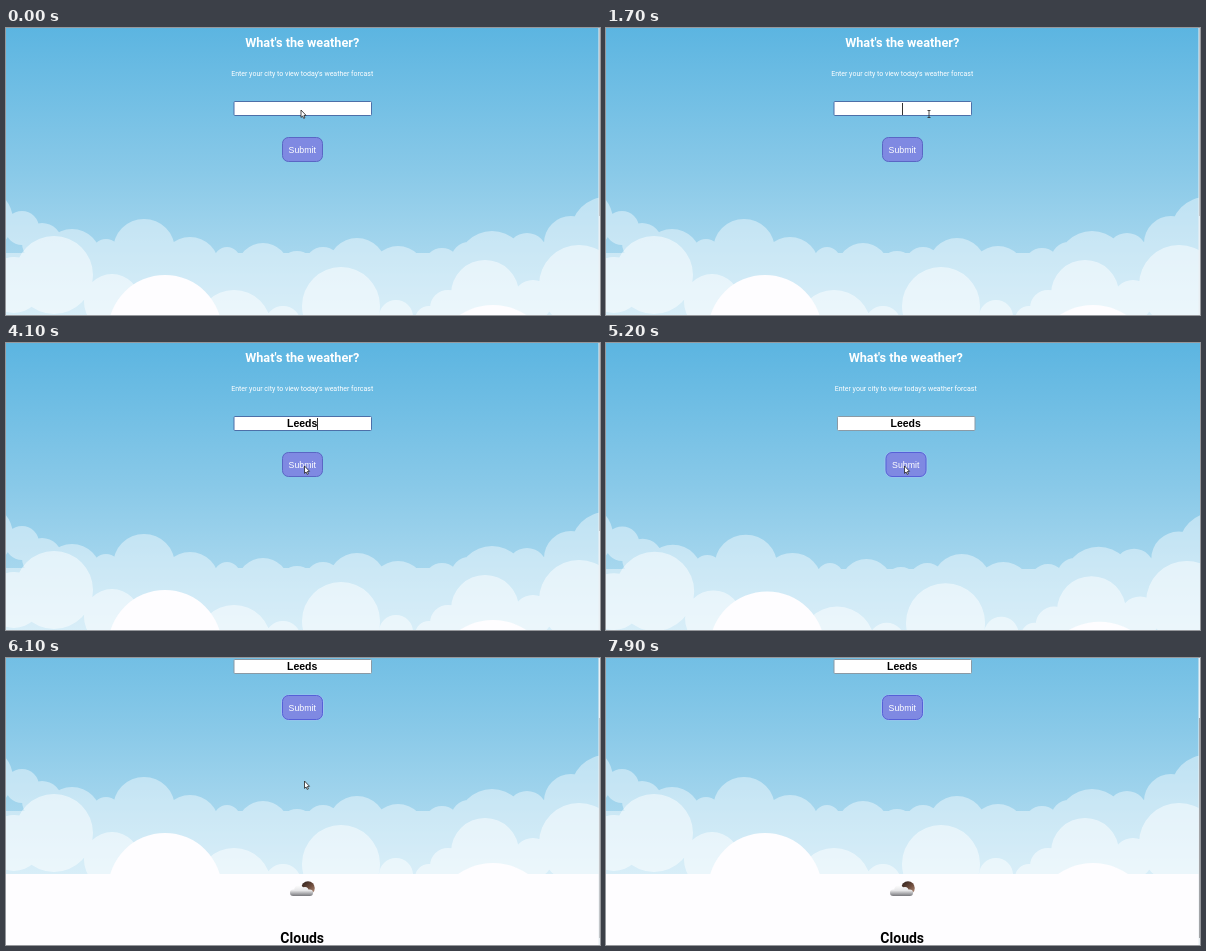
An HTML page with a canvas for the animation above (8000 ms loop, 594 by 287 pixels).

```html
<!DOCTYPE html>
<html lang="en">
<head>
<meta charset="utf-8">
<title>Weather form</title>
<style>
  html, body { margin: 0; width: 100%; height: 100%; overflow: hidden; background: #fefdff; }
  canvas { display: block; }
</style>
</head>
<body>
<canvas id="stage" width="594" height="287"></canvas>
<script>
const g = document.getElementById('stage').getContext('2d');
const W = 594, H = 287, LOOP = 8000;
const MID = 296.5, SKY = 288, SCROLL = 72;
const WHITE = '#fefdff';

// Clouds as x, y, radius, back to front
const CLOUDS = [
  ['rgba(255,255,255,.41)', [
    [-24, 192, 31], [16, 200, 17], [36, 215, 20], [66, 230, 29], [100, 225, 14],
    [138, 222, 31], [184, 238, 29], [221, 232, 13], [257, 241, 26], [291, 241, 18],
    [317, 237, 18], [351, 239, 29], [392, 246, 28], [436, 238, 18], [463, 232, 18],
    [486, 238, 35], [521, 225, 20], [565, 215, 27], [600, 204, 35]], 225],
  ['rgba(255,255,255,.5)', [
    [8, 257, 28], [48, 247, 39], [106, 274, 28], [228, 299, 37], [277, 296, 18],
    [335, 278, 39], [390, 289, 17], [423, 292, 14], [442, 280, 18], [479, 266, 34],
    [527, 272, 20], [573, 257, 40]]],
  [WHITE, [[159, 304, 57], [487, 338, 61]]]
];

// Time events in ms
const KEYS = [2000, 2250, 2500, 2750, 3000];
const FOCUS = 600, CLICK = 4700, LOADING = 5000, RESULT = 5250;

// Pointer path as time, x, y
const PATH = [
  [0, 295, 82], [250, 295, 82], [1300, 323, 86], [3300, 323, 86],
  [3900, 298.5, 123], [6400, 298.5, 123], [7000, 600, 150]
];

function pointerAt(t) {
  const i = PATH.findIndex(p => p[0] > t);
  if (i < 0) return PATH[PATH.length - 1].slice(1);
  const [a, x, y] = PATH[i - 1], [b, u, v] = PATH[i];
  const k = (t - a) / (b - a), e = k * k * (3 - 2 * k);
  return [x + (u - x) * e, y + (v - y) * e];
}

function box(x, y, w, h, r, fill, stroke, line = 1) {
  g.beginPath();
  g.roundRect(x, y, w, h, r);
  if (fill) { g.fillStyle = fill; g.fill(); }
  if (stroke) { g.strokeStyle = stroke; g.lineWidth = line; g.stroke(); }
}

function label(text, y, font, color) {
  g.font = font;
  g.fillStyle = color;
  g.fillText(text, MID - .3, y);
}

function gradient(x0, y0, x1, y1, ...colors) {
  const grad = g.createLinearGradient(x0, y0, x1, y1);
  colors.forEach((c, i) => grad.addColorStop(i / (colors.length - 1), c));
  return grad;
}

function discs(list, fill, base) {
  g.beginPath();
  for (const [x, y, r] of list) {
    g.moveTo(x + r, y);
    g.arc(x, y, r, 0, 7);
  }
  if (base) g.rect(-10, base, W + 20, SKY + 10 - base);
  g.fillStyle = fill;
  g.fill();
}

function backdrop(scale) {
  g.save();
  g.beginPath();
  g.rect(0, 0, W, SKY);
  g.clip();
  g.fillStyle = gradient(0, 0, 0, SKY, '#5cb5e1', '#89c9e8', '#bce1f2');
  g.fillRect(0, 0, W, SKY);
  g.translate(0, SKY / 2);
  g.scale(scale, scale);
  g.translate(0, -SKY / 2);
  for (const [fill, list, base] of CLOUDS) discs(list, fill, base);
  g.restore();
}

function form(t) {
  label("What's the weather?", 19.3, 'bold 12.7px Roboto, sans-serif', '#fff');
  label("Enter your city to view today's weather forcast", 48, '7px Roboto, sans-serif', '#fff');

  const typing = t < CLICK;
  const text = 'Leeds'.slice(0, KEYS.filter(k => k <= t).length);
  box(MID - 68.5, 73.5, 137.5, 14, 1, '#fff', typing ? '#4d6fa8' : '#8b9aa5');
  label(text, 84, 'bold 10.5px "Liberation Sans", Arial, sans-serif', '#000');
  const blinkStart = [FOCUS, ...KEYS].filter(k => k <= t).pop();
  if (typing && (t - blinkStart) % 1000 < 500) {
    g.fillStyle = '#333';
    g.fillRect(Math.round(MID - .5 + g.measureText(text).width / 2), 75, 1, 12);
  }

  if (!typing) box(MID - 21, 109, 42, 25, 7, null, '#a5c2f2', .8);
  box(MID - 20, 109.5, 40, 24, 6, '#7f89e2', typing ? '#5a66c4' : '#5660d8');
  label('Submit', 124.6, '8.75px "Liberation Sans", Arial, sans-serif', '#fff');
}

function forecast() {
  discs([[302, 302, 6.8]], gradient(297, 296, 307, 308, '#33241f', '#6b4a3b', '#b08c78'));
  g.fillStyle = gradient(0, 299, 0, 310, '#ffffff', '#e6e6e8', '#77777c');
  g.beginPath();
  g.roundRect(284, 303.5, 23, 6.5, 3.2);
  g.arc(293, 304, 4.8, 0, 7);
  g.moveTo(302, 304.5);
  g.arc(299, 304.5, 3.5, 0, 7);
  g.fill();
  label('Clouds', 357, 'bold 14px Roboto, sans-serif', '#000');
}

function scrollbar(t, done) {
  g.fillStyle = '#e9eff3';
  g.fillRect(592.5, 0, 2, H);
  g.fillStyle = t > 6900 ? '#a3a5a8' : '#c3c6c9';
  if (done) g.fillRect(593, 60, 1, 220);
  else g.fillRect(593, 0, 1, 188);
}

function pointer(t) {
  const [x, y] = pointerAt(t);
  const beam = t > 300 && y < 88 && t < 4000;
  g.save();
  g.translate(x, y);
  g.beginPath();
  if (beam) {
    g.moveTo(-1.5, -3.5); g.lineTo(1.5, -3.5);
    g.moveTo(0, -3.5); g.lineTo(0, 3.5);
    g.moveTo(-1.5, 3.5); g.lineTo(1.5, 3.5);
  } else {
    for (const [u, v] of [[0, 0], [0, 7.4], [1.6, 6], [2.7, 8.4], [3.9, 7.9], [2.9, 5.5], [5, 5.3]]) g.lineTo(u, v);
    g.closePath();
    g.fillStyle = '#fff';
    g.fill();
  }
  g.strokeStyle = '#222';
  g.lineWidth = .8;
  g.stroke();
  g.restore();
}

function draw(t) {
  const done = t >= RESULT, loading = t >= LOADING && !done;
  g.fillStyle = WHITE;
  g.fillRect(0, 0, W, H);
  g.textAlign = 'center';
  g.save();
  if (done) g.translate(0, -SCROLL);
  backdrop(loading ? 600 / 592 : 1);
  if (loading) g.translate(3.5, 0);
  form(t);
  if (done) forecast();
  g.restore();
  if (!loading) scrollbar(t, done);
  pointer(t);
}

const start = performance.now();
function tick() {
  draw((performance.now() - start) % LOOP);
  requestAnimationFrame(tick);
}
tick();
</script>
</body>
</html>
```
